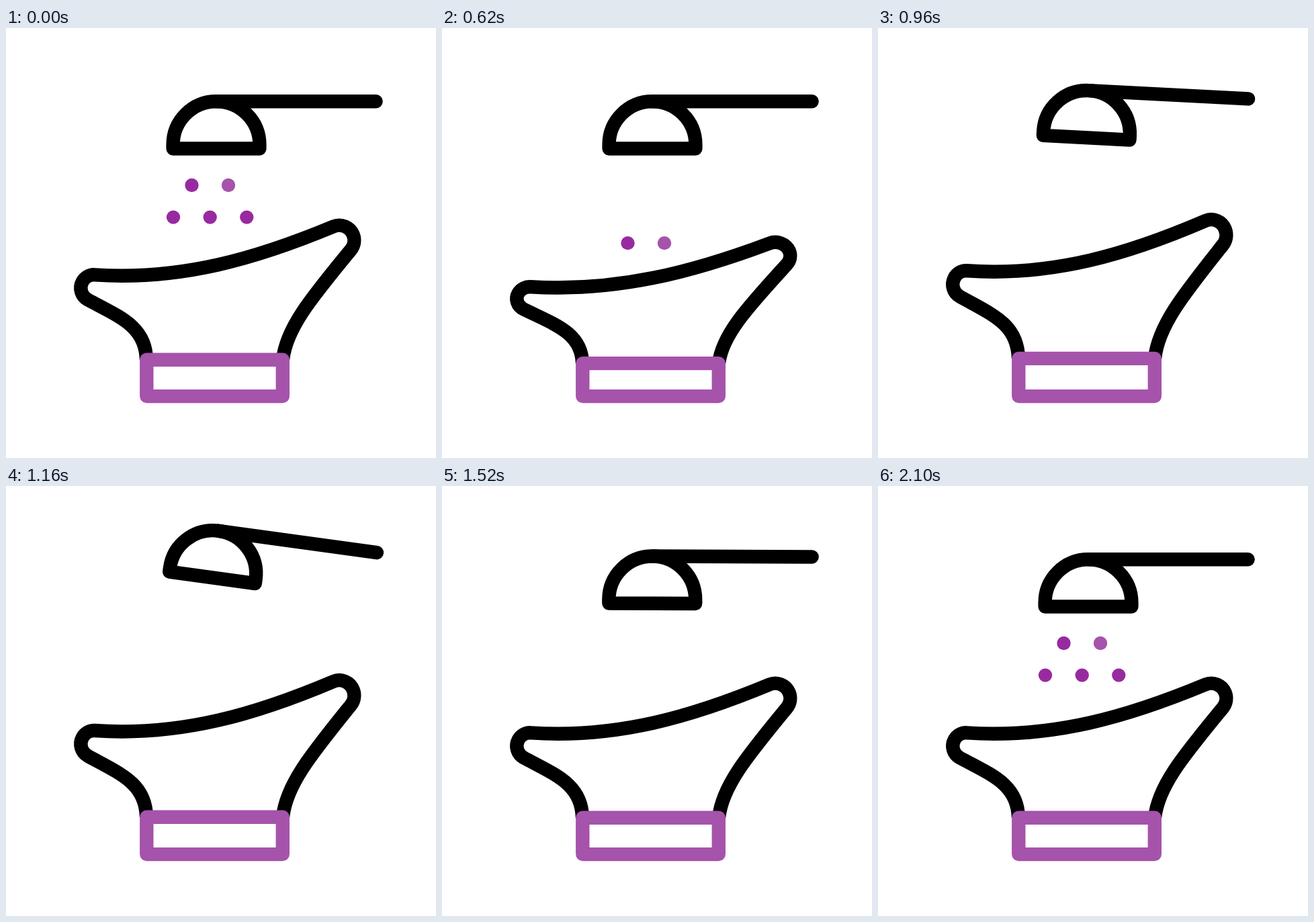
Write an HTML page with a canvas that moves like this. It is 640 by 640 pixels and loops after 2.4 s.

```html
<!DOCTYPE html>
<html lang="en">
<head>
<meta charset="utf-8">
<title>Hair wash basin</title>
<style>
  html, body { margin: 0; width: 100%; height: 100%; overflow: hidden; background: #fff; }
  canvas { display: block; width: 100vmin; height: 100vmin; }
</style>
</head>
<body>
<canvas id="stage" width="640" height="640"></canvas>
<script>
const ctx = document.getElementById('stage').getContext('2d');
const LOOP = 2400;
const LINE = 20.4;
const BLACK = '#000', LIGHT = '#a553ab', DARK = '#982aa0';
const RAD = Math.PI / 180;

const ease = p => (1 - Math.cos(Math.PI * p)) / 2;

// Eased value at time t through [time, value] keys.
function track(t, ...keys) {
  if (t <= keys[0][0]) return keys[0][1];
  for (let i = 1; i < keys.length; i++) {
    const [t0, v0] = keys[i - 1], [t1, v1] = keys[i];
    if (t < t1) return v0 + (v1 - v0) * ease((t - t0) / (t1 - t0));
  }
  return keys[keys.length - 1][1];
}

function stroke(color) {
  ctx.strokeStyle = color;
  ctx.stroke();
}

function fillWhite() {
  ctx.fillStyle = '#fff';
  ctx.fill();
}

function dropY(t, rest, fall, rise, land) {
  if (t < 1200) return track(t, [fall, rest], [fall + 640, rest + 165]);
  return track(t, [rise, 175], [land, rest + 3], [2100, rest]);
}

function drawDrops(t) {
  if (t > 940 && t < 1560) return;
  const dot = (x, y, color) => {
    ctx.beginPath();
    ctx.arc(x, y, 10.2, 0, 2 * Math.PI);
    ctx.fillStyle = color;
    ctx.fill();
  };
  const upper = dropY(t, 234, 292, 1640, 1920);
  const lower = dropY(t, 281.6, 190, 1560, 1860);
  dot(276.5, upper, DARK);
  dot(331, upper, LIGHT);
  for (const x of [249, 303.7, 358.3]) dot(x, lower, DARK);
}

// The outline is squashed towards its base while the line keeps its width.
function drawBasin(t) {
  const k = track(t, [200, 1], [600, 0.9], [1000, 1.0367], [1320, 1]);
  const base = 548.1;
  ctx.save();
  ctx.translate(0, base);
  ctx.scale(1, k);
  ctx.translate(0, -base);
  ctx.beginPath();
  ctx.moveTo(209, 493.7);
  ctx.bezierCurveTo(208, 444, 170, 430.5, 121.7, 404.4);
  ctx.arc(131, 387, 19.7, 118 * RAD, 273 * RAD);
  ctx.bezierCurveTo(261, 376, 373, 343, 487.5, 295.4);
  ctx.arc(496, 316, 22.3, -112.5 * RAD, 40 * RAD);
  ctx.bezierCurveTo(456, 400, 417, 446, 412, 493.7);
  ctx.restore();
  fillWhite();
  stroke(BLACK);

  const top = base - 54.4 * k;
  ctx.beginPath();
  ctx.rect(209.3, top, 202.5, base - top);
  fillWhite();
  stroke(LIGHT);
}

function drawShower(t) {
  const angle = track(t, [790, 0], [1200, 8], [1560, 0]);
  const dy = track(t, [790, 0], [1200, -10.4], [1850, 3], [2100, 0]);
  ctx.save();
  ctx.translate(551, 119 + dy);
  ctx.rotate(angle * RAD);
  ctx.translate(-551, -119);
  ctx.beginPath();
  ctx.moveTo(248.6, 179.5);
  ctx.arc(313, 173.7, 64.4, Math.PI, 2 * Math.PI);
  ctx.lineTo(377.4, 179.5);
  ctx.closePath();
  fillWhite();
  stroke(BLACK);
  ctx.beginPath();
  ctx.moveTo(313, 109.3);
  ctx.lineTo(550.6, 109.3);
  ctx.lineCap = 'round';
  stroke(BLACK);
  ctx.restore();
}

function draw(t) {
  ctx.fillStyle = '#fff';
  ctx.fillRect(0, 0, 640, 640);
  ctx.lineWidth = LINE;
  ctx.lineJoin = 'round';
  drawDrops(t);
  drawBasin(t);
  drawShower(t);
}

const start = performance.now();
function frame() {
  draw((performance.now() - start) % LOOP);
  requestAnimationFrame(frame);
}
frame();
</script>
</body>
</html>
```
